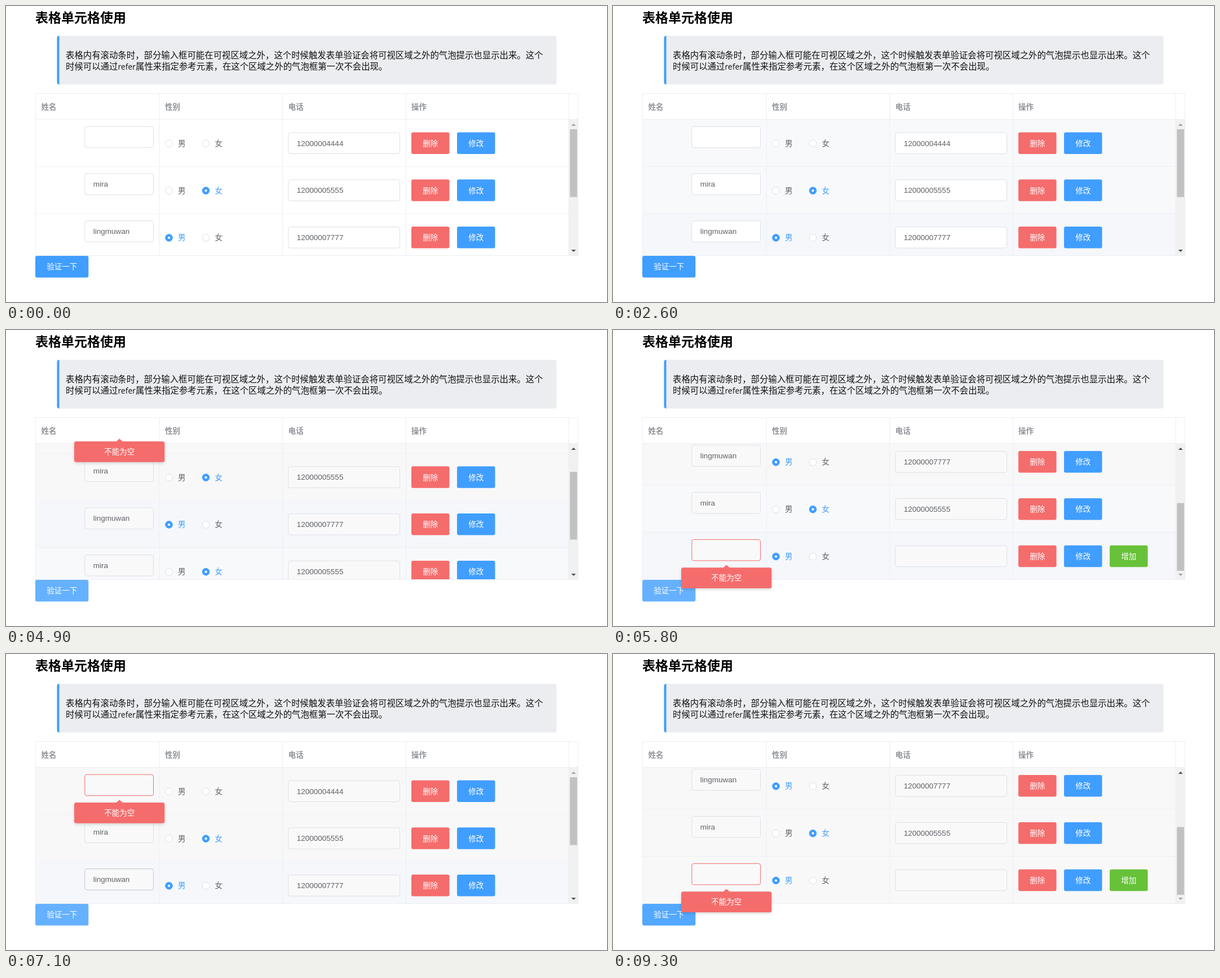
Write an HTML page that moves like this. It is 1066 px wide and 526 px high and loops after 9.4 s.

```html
<!DOCTYPE html>
<html lang="zh-CN">
<head>
<meta charset="utf-8">
<title>表格单元格使用</title>
<style>
  html, body { margin: 0; width: 100%; height: 100%; overflow: hidden; background: #fff; }
  svg { display: block; width: 1066px; height: 526px; }
  text { font: 13.5px "Noto Sans CJK SC", "Noto Sans CJK", sans-serif; fill: #606266; }
  .mid { text-anchor: middle; fill: #fff; }
  .val { font-family: "Liberation Sans", Arial, sans-serif; }
  .head { font-weight: bold; fill: #909399; }
  .note { font-size: 15.4px; fill: #111; }
</style>
</head>
<body>
<svg id="stage" viewBox="0 0 1066 526" xmlns="http://www.w3.org/2000/svg">
  <defs>
    <clipPath id="view"><rect x="52" y="202" width="946" height="241.5"/></clipPath>
    <filter id="shade" x="-10%" y="-30%" width="120%" height="170%">
      <feDropShadow dx="0" dy="2" stdDeviation="2.5" flood-color="#000" flood-opacity=".16"/>
    </filter>
  </defs>
</svg>
<script>
const LOOP = 9400, TOP = 202, ROW = 83.8, MAX = 177;
const BLUE = '#409eff', RED = '#f56c6c', GREEN = '#67c23a', LINE = '#ebeef5', EDGE = '#dcdfe6';
const stage = document.getElementById('stage');

function add(parent, tag, attrs, text) {
  const el = document.createElementNS(stage.namespaceURI, tag);
  for (const k in attrs) el.setAttribute(k, attrs[k]);
  if (text) el.textContent = text;
  parent.appendChild(el);
  return el;
}
const group = (parent, attrs = {}) => add(parent, 'g', attrs);
const rect = (p, x, y, width, height, fill, more = {}) =>
  add(p, 'rect', { x, y, width, height, fill, ...more });
const label = (p, x, y, str, cls = '', more = {}) =>
  add(p, 'text', { x, y, class: cls, ...more }, str);
const path = (p, d, fill) => add(p, 'path', { d, fill });

function button(p, x, y, w, str, fill) {
  const box = rect(p, x, y, w, 38.5, fill, { rx: 3 });
  label(p, x + w / 2, y + 24.4, str, 'mid');
  return box;
}
function field(p, x, y, w, str) {
  const box = rect(p, x + .5, y + .5, w - 1, 37.5, '#fff', { rx: 3.5, stroke: EDGE });
  label(p, x + 15.5, y + 24, str, 'val');
  return box;
}
function radio(p, x, str, on) {
  add(p, 'circle', { cx: x, cy: 42.3, r: 6.3, fill: on ? BLUE : '#fff', stroke: on ? BLUE : EDGE });
  if (on) add(p, 'circle', { cx: x, cy: 42.3, r: 2.1, fill: '#fff' });
  label(p, x + 16, 46.8, str, '', on ? { style: 'fill:' + BLUE } : {});
}

// Heading and note
label(stage, 52, 28.6, '表格单元格使用', '', { style: 'font-size:23px;font-weight:bold;fill:#000' });
rect(stage, 90.5, 53, 886, 86.5, '#ebedf0', { rx: 4 });
path(stage, 'M94.5 53v86.5a4 4 0 0 1-4-4V57a4 4 0 0 1 4-4z', BLUE);
label(stage, 106, 92.8, '表格内有滚动条时，部分输入框可能在可视区域之外，这个时候触发表单验证会将可视区域之外的气泡提示也显示出来。这个', 'note');
label(stage, 106, 113, '时候可以通过', 'note');
label(stage, 198.4, 113, 'refer', 'note', { style: 'font:14px "Open Sans",sans-serif' });
label(stage, 230, 113, '属性来指定参考元素，在这个区域之外的气泡框第一次不会出现。', 'note');

// Table rows
const people = [
  ['', '', '12000004444'],
  ['mira', '女', '12000005555'],
  ['lingmuwan', '男', '12000007777'],
  ['mira', '女', '12000005555'],
  ['', '男', ''],
];
const body = group(stage, { 'clip-path': 'url(#view)' });
const rows = people.map(([name, sex, phone], i) => {
  const g = group(body);
  const bg = rect(g, 52, 0, 946, ROW, '#fff');
  rect(g, 52, ROW - 1, 946, 1, LINE);
  const nameBox = field(g, 139.3, 11.7, 122.7, name);
  radio(g, 289, '男', sex === '男');
  radio(g, 354.5, '女', sex === '女');
  const phoneBox = field(g, 500.3, 22.5, 198.7, phone);
  button(g, 719, 22.5, 67.5, '删除', RED);
  button(g, 800, 22.5, 67.5, '修改', BLUE);
  if (i === 4) button(g, 881, 22.5, 67.5, '增加', GREEN);
  return { g, bg, nameBox, phoneBox };
});

// Scroll bar
rect(stage, 998, TOP, 16, 241, '#f1f1f1');
const thumb = rect(stage, 1000.3, 219, 12.7, 120.5, '#c1c1c1');
const up = path(stage, 'M1002.7 213h8l-4-4z');
const down = path(stage, 'M1002.7 433h8l-4 4z');

// Grid and header
for (const x of [52, 271.7, 490.2, 709, 997.6, 1014]) rect(stage, x, 155, 1, 288.5, LINE);
for (const y of [155, 201, 443]) rect(stage, 52, y, 963, 1, LINE);
[[62.5, '姓名'], [282, '性别'], [500.7, '电话'], [719, '操作']]
  .forEach(([x, str]) => label(stage, x, 184, str, 'head'));

const check = button(stage, 52, 444, 94.3, '验证一下', BLUE);

function bubble() {
  const g = group(stage);
  const tip = group(g, { filter: 'url(#shade)' });
  rect(tip, 121, 62, 160.3, 36.7, RED, { rx: 3.5 });
  path(tip, 'M195.2 62.5l6-5.2 6 5.2z', RED);
  label(g, 201.2, 85.2, '不能为空', 'mid');
  return g;
}
const tips = [bubble(), bubble()];

// Held states: [start in ms, value]
const scroll = [[0, 0], [1900, 2], [2000, 77], [2100, 96], [2500, 40], [2600, 0],
  [4800, 3], [4900, 66], [5000, 97], [5100, 128], [5200, 165], [5300, MAX],
  [6500, 174], [6600, 120], [6700, 86], [6800, 78], [6900, 55], [7000, 10], [7100, 0],
  [7900, 3], [8000, 62], [8100, 97], [8200, 116], [8300, 150], [8400, 170], [8500, MAX]];
const tint = [[0, 'WWWWW'], [300, 'AWWWW'], [400, 'HWWWW'], [700, 'AHWWW'], [1000, 'AAAWW'],
  [1100, 'AAHWW'], [1400, 'AAAWW'], [1900, 'AAHAA'], [2500, 'AAHAA'], [3000, 'AAAAA'],
  [4000, 'HGGGG'], [4500, 'GHGGG'], [4800, 'GGHAA'], [5300, 'GGGAA'], [5600, 'GGGAH'],
  [6500, 'GGGHA'], [7000, 'GGHGG'], [8100, 'GGGHG'], [8400, 'GGGGG']];
const checkFill = [[0, BLUE], [1400, '#66b1ff'], [1600, BLUE], [3000, '#53a8ff'], [3100, '#66b1ff'],
  [3300, '#3a8ee6'], [3400, '#66b1ff'], [9300, '#53a8ff']];
const tipAlpha = [
  [[0, 0], [3300, .2], [3400, .6], [3500, .9], [3600, 1], [5100, 0], [7000, 1], [8200, 0]],
  [[0, 0], [5300, 1], [6800, 0], [8500, 1]],
];
const overInput = [[0, -1], [7000, 2], [7900, -1], [8200, 3], [8300, -1]];
const tones = { W: '#fff', A: '#f8f9fb', H: '#f5f7fb', G: '#f8f8f8' };

function held(list, t) {
  let v = list[0][1];
  for (const [start, value] of list) if (t >= start) v = value;
  return v;
}

function draw(t) {
  const s = held(scroll, t), tone = held(tint, t), over = held(overInput, t);
  rows.forEach((r, i) => {
    const bad = t >= 3300 && (i === 0 || i === 4);
    const fill = t >= 4800 || (t >= 4000 && i === 1) ? '#f9f9fa' : '#fff';
    r.g.setAttribute('transform', `translate(0 ${TOP + i * ROW - s})`);
    r.bg.setAttribute('fill', tones[tone[i]]);
    r.nameBox.setAttribute('fill', fill);
    r.phoneBox.setAttribute('fill', fill);
    r.nameBox.setAttribute('stroke', bad ? RED : i === over ? '#c0c4cc' : EDGE);
  });
  tips.forEach((g, i) => {
    g.setAttribute('transform', `translate(0 ${TOP + i * 4 * ROW - s})`);
    g.setAttribute('opacity', held(tipAlpha[i], t));
  });
  thumb.setAttribute('y', 219 + s / 2);
  up.setAttribute('fill', s > 0 ? '#505050' : '#a3a3a3');
  down.setAttribute('fill', s < MAX ? '#505050' : '#a3a3a3');
  check.setAttribute('fill', held(checkFill, t));
}

const began = performance.now();
function tick() {
  draw((performance.now() - began) % LOOP);
  requestAnimationFrame(tick);
}
draw(0);
requestAnimationFrame(tick);
</script>
</body>
</html>
```
